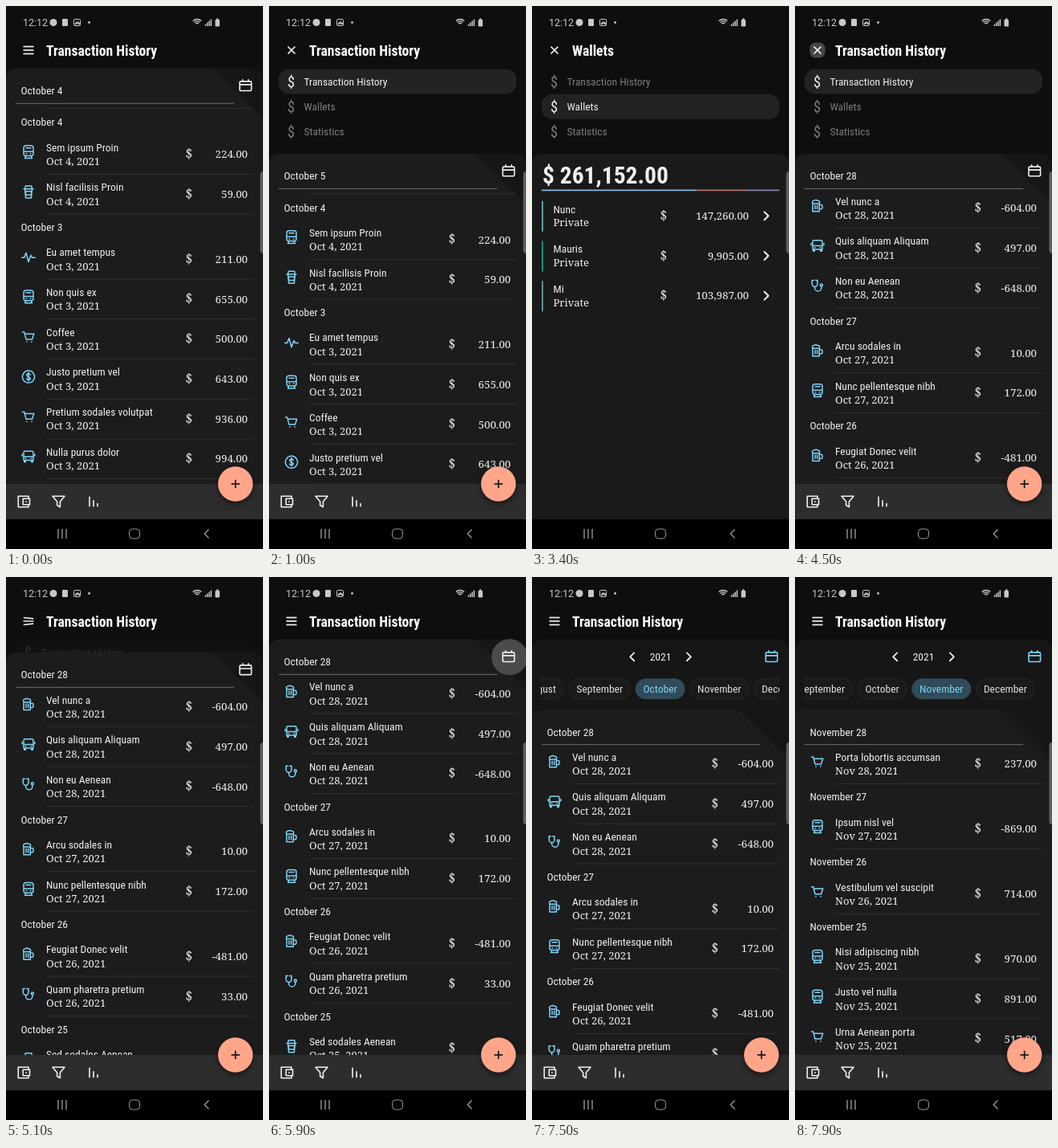
Write an HTML page with a canvas that moves like this. It is 320x676 px and loops after 8000 ms.

```html
<!DOCTYPE html>
<html lang="en">
<head>
<meta charset="utf-8">
<title>Transaction History</title>
<style>
html, body { margin: 0; height: 100%; overflow: hidden; background: #000; }
canvas { display: block; width: 100vw; height: 100vh; }
</style>
</head>
<body>
<canvas></canvas>
<script>
const canvas = document.querySelector('canvas');
const ctx = canvas.getContext('2d');
const LOOP = 8000, WHITE = '#f0f0f0', CYAN = '#7fd3f8', CORAL = '#ffa68a';
const BACK = '#0e0e0e', PANEL = '#1c1c1c', SHEET = '#161616', RULE = '#303030';

// Icons on a 24 unit grid
const icons = {
  train: 'M8 1h8q4 0 4 4v9q0 4-3 4H7q-3 0-3-4V5q0-4 4-4zM4 11h16M8 14.5h1M15 14.5h1M8 18l-2 4h12l-2-4M8 5h8',
  cup: 'M4 7h16M6 7l1-5h10l1 5M6 7l1.5 15h9L18 7M7 11h10l-.5 6h-9z',
  pulse: 'M1 13h4l3-8 4 15 4-11 2 4h5',
  cart: 'M2 4h3l3 12h10l3-9H6M9 20h.6M17 20h.6',
  coin: 'M12 2a10 10 0 1 0 .01 0zM15 9C15 6 9 6.5 9 9.5S15 12 15 14.7 9 17.5 9 15M12 5v14',
  car: 'M6 3h12q2 0 2 3v12H4V6q0-3 2-3zM4 12h16M7 15h1M16 15h1M5 18v3h2v-3M17 18v3h2v-3M1.5 8v3M22.5 8v3',
  beer: 'M4 8v13h11V8M4 8q-2-4 2-5 4-2 6 0 5 0 3 5zM15 10h3q2 0 2 2v3q0 2-2 2h-3M8 11v6M11.5 11v6',
  steth: 'M6 3H3v6a4.5 4.5 0 0 0 9 0V3h-3M7.5 13.5v2a5.5 5.5 0 0 0 11 0V13M18.5 9a2 2 0 1 0 .01 0z',
  calendar: 'M4 5h16q2 0 2 2v12q0 2-2 2H4q-2 0-2-2V7q0-2 2-2zM2 10.500h20M7 2v3M17 2v3',
  wallet: 'M20 7V3H3v18h17v-4M11 7h11v10H11zM15.5 12h1',
  funnel: 'M2 3h20l-7.5 9v9l-5-3v-6z',
  bars: 'M4 3v18M12 10v11M20 16v5',
  right: 'M9 5l7 7-7 7',
  left: 'M15 5l-7 7 7 7'
};
for (const name in icons) icons[name] = new Path2D(icons[name]);

// Each day: label, then "icon|title|amount" rows
const days = (month, text) => text.split('\n').map(line => {
  const [day, ...rows] = line.split('; ');
  return { label: `${month} ${day}`, date: `${month.slice(0, 3)} ${day}, 2021`, rows: rows.map(r => r.split('|')) };
});
const earlyOctober = days('October', `4; train|Sem ipsum Proin|224.00; cup|Nisl facilisis Proin|59.00
3; pulse|Eu amet tempus|211.00; train|Non quis ex|655.00; cart|Coffee|500.00; coin|Justo pretium vel|643.00; cart|Pretium sodales volutpat|936.00; car|Nulla purus dolor|994.00`);
const lateOctober = days('October', `28; beer|Vel nunc a|-604.00; car|Quis aliquam Aliquam|497.00; steth|Non eu Aenean|-648.00
27; beer|Arcu sodales in|10.00; train|Nunc pellentesque nibh|172.00
26; beer|Feugiat Donec velit|-481.00; steth|Quam pharetra pretium|33.00
25; cup|Sed sodales Aenean|45.00`);
const november = days('November', `28; cart|Porta lobortis accumsan|237.00
27; train|Ipsum nisl vel|-869.00
26; cart|Vestibulum vel suscipit|714.00
25; train|Nisi adipiscing nibh|970.00; train|Justo vel nulla|891.00; cart|Urna Aenean porta|517.00`);
const pages = ['Transaction History', 'Wallets', 'Statistics'];
const months = ['August', 'September', 'October', 'November', 'December'];

const ramp = (t, from, to) => Math.min(1, Math.max(0, (t - from) / (to - from)));
const ease = (t, from, to) => { const x = ramp(t, from, to); return x * x * (3 - 2 * x); };
const mix = (a, b, p) => a + (b - a) * p;
const pulse = (t, start) => t < start ? 0 : 1 - ramp(t, start, start + 300);

const sans = (size, weight = 400) => `${weight} ${size}px "Roboto Condensed", Roboto, sans-serif`;
const serif = size => `${size}px "Noto Serif", serif`;
let tracking = 0; // em, used when no condensed face is installed

function checkCondensed() {
  const width = font => (ctx.font = font, ctx.measureText('Transaction History').width);
  tracking = width(sans(100)) < width('100px Roboto, sans-serif') - 20 ? 0 : -0.05;
}
function setFont(font) {
  ctx.font = font;
  const size = parseFloat(font.match(/([\d.]+)px/)[1]);
  ctx.letterSpacing = (font.includes('Condensed') ? tracking * size : 0) + 'px';
  return size;
}
function text(str, x, y, font = sans(13.5), color = WHITE, align = 'left') {
  const size = setFont(font);
  ctx.fillStyle = color;
  ctx.textAlign = align;
  ctx.fillText(str, x, y + size * 0.355);
}
function money(amount, x, right, y) {
  text('$', x, y, serif(15.5));
  text(amount, right, y, serif(13.3), WHITE, 'right');
}
function box(x, y, w, h, r, fill, stroke) {
  ctx.beginPath();
  ctx.roundRect(x, y, w, h, r);
  if (fill) { ctx.fillStyle = fill; ctx.fill(); }
  if (stroke) { ctx.strokeStyle = stroke; ctx.lineWidth = 1; ctx.stroke(); }
}
const disc = (x, y, r, color) => box(x - r, y - r, 2 * r, 2 * r, r, color);
function line(x1, y1, x2, y2, color, width = 1) {
  ctx.strokeStyle = color;
  ctx.lineWidth = width;
  ctx.beginPath();
  ctx.moveTo(x1, y1);
  ctx.lineTo(x2, y2);
  ctx.stroke();
}
function icon(name, x, y, color = WHITE, size = 18, width = 1.5) {
  ctx.save();
  ctx.translate(x - size / 2, y - size / 2);
  ctx.scale(size / 24, size / 24);
  ctx.lineWidth = width * 24 / size;
  ctx.lineCap = ctx.lineJoin = 'round';
  ctx.strokeStyle = color;
  ctx.stroke(icons[name]);
  ctx.restore();
}
function layer(alpha, draw, clip) {
  if (alpha <= 0) return;
  ctx.save();
  ctx.globalAlpha *= alpha;
  if (clip) { ctx.beginPath(); ctx.rect(...clip); ctx.clip(); }
  draw();
  ctx.restore();
}

function statusBar() {
  const grey = '#c8c8c8';
  text('12:12', 21, 20.5, '12.5px Roboto, sans-serif', grey);
  disc(59, 20.5, 4.5, grey);
  box(70, 16, 7, 9, 1, grey);
  box(84.5, 16.5, 8, 8, 1, null, grey);
  line(86, 23, 89, 20, grey, 2);
  line(89, 20, 92, 23, grey, 2);
  disc(103.5, 20.5, 1.4, grey);
  for (const r of [2.5, 5, 7.5]) {
    ctx.beginPath();
    ctx.arc(238, 24, r, -2.35, -0.8);
    ctx.strokeStyle = grey;
    ctx.lineWidth = 1.4;
    ctx.stroke();
  }
  for (let i = 0; i < 4; i++) line(248.5 + i * 2.3, 25, 248.5 + i * 2.3, 22.5 - i * 2, grey, 1.5);
  box(260.5, 17, 5.5, 8.5, 1, grey);
  box(262, 15.5, 2.5, 2, 0, grey);
}

function menuButton(open, ripple) {
  layer(ripple, () => box(18.5, 45.5, 19, 19, 7, '#464646'));
  const x = mix(6.5, 4.5, open), y = 4.5, turn = y * (1 - 2 * open);
  line(28 - x, 55 - y, 28 + x, 55 - turn, WHITE, 1.7);
  line(28 - x, 55 + y, 28 + x, 55 + turn, WHITE, 1.7);
  layer(1 - open, () => line(21.5, 55, 34.5, 55, WHITE, 1.7));
}

function menu(selected) {
  pages.forEach((name, i) => {
    const y = 94 + i * 31.2, on = i === selected, color = on ? WHITE : '#7d7d7d';
    if (on) box(12, y - 15.5, 296, 31, 13, '#232323');
    text('$', 27.5, y, sans(18.5), color, 'center');
    text(name, 43.5, y, sans(13.5), color);
  });
}

function list(data, y) {
  for (const day of data) {
    text(day.label, 18.5, y);
    y += 31.2;
    for (const [name, title, amount] of day.rows) {
      icon(name, 28, y + 6, CYAN);
      text(title, 50, y);
      text(day.date, 50, y + 17.5, serif(13));
      money(amount, 223.5, 301, y + 8.7);
      line(50, y + 33.5, 308, y + 33.5, RULE);
      y += 49.7;
    }
  }
}

function filter(top, shift) {
  icon('left', 125, top + 21.5, WHITE, 17, 1.8);
  text('2021', 160, top + 21.5, sans(13.5), WHITE, 'center');
  icon('right', 195, top + 21.5, WHITE, 17, 1.8);
  layer(1, () => {
    setFont(sans(13.5));
    const widths = months.map(m => ctx.measureText(m).width + 19);
    let x = mix(129, 78, shift) - widths[0] - widths[1] - 13;
    months.forEach((name, i) => {
      const on = i === (shift > 0.4 ? 3 : 2);
      box(x, top + 49, widths[i], 25, 12.5, on ? '#304b59' : '#1a1a1a', on ? '#304b59' : '#282828');
      text(name, x + widths[i] / 2, top + 61.5, sans(13.5), on ? CYAN : '#dedede', 'center');
      x += widths[i] + 6.5;
    });
  }, [11, top + 40, 297, 45]);
}

function frontPanel(y) {
  const cut = 63;
  ctx.fillStyle = PANEL;
  ctx.beginPath();
  ctx.moveTo(0, 640);
  ctx.lineTo(0, y + 14);
  ctx.quadraticCurveTo(0, y, 14, y);
  ctx.lineTo(320 - cut, y);
  ctx.lineTo(320, y + cut);
  ctx.lineTo(320, 640);
  ctx.fill();
}

function bottomBar() {
  box(0, 595, 320, 44, 0, '#2d2d2d');
  icon('wallet', 22, 617, WHITE, 18, 1.6);
  icon('funnel', 65.5, 617, WHITE, 18, 1.6);
  icon('bars', 109, 617, WHITE, 15, 1.6);
  ctx.save();
  ctx.shadowColor = 'rgba(0,0,0,.5)';
  ctx.shadowBlur = 7;
  ctx.shadowOffsetY = 3;
  disc(285.7, 595, 21.7, CORAL);
  ctx.restore();
  line(280.5, 595, 291, 595, '#161616', 1.7);
  line(285.7, 589.8, 285.7, 600.2, '#161616', 1.7);
}

function transactions(t, top) {
  const expanded = ease(t, 5900, 6300), shift = ease(t, 7500, 7850), swap = ramp(t, 7550, 7850);
  const front = top + 87.3 * expanded, label = front + 27.7;
  const late = t >= 3700;
  box(0, top, 320, 640 - top, [14, 14, 0, 0], SHEET);
  layer(expanded, () => filter(top, shift));
  frontPanel(front);
  layer(pulse(t, 5900), () => disc(299.5, top + 22, 22.5, '#4c4c4c'));
  icon('calendar', 298.3, top + 21.2, t > 6000 ? CYAN : WHITE, 17.5, 1.6);

  const body = [0, label + 16, 320, 595 - label - 16];
  if (late) {
    layer(1 - swap, () => list(lateOctober, label), body);
    layer(swap, () => list(november, label), body);
  } else {
    layer(1, () => {
      list(earlyOctober, label + 39.2);
      line(50, label + 22, 308, label + 22, RULE);
    }, body);
  }
  const sticky = late ? (swap > 0.5 ? 'November 28' : 'October 28') : t < 500 ? 'October 4' : 'October 5';
  text(sticky, 18.5, label);
  line(12, label + 15.8, 284, label + 15.8, '#6c6c6c');
  bottomBar();
}

function wallets(top) {
  box(0, top, 320, 639 - top, [14, 14, 0, 0], '#1a1a1a');
  text('$ 261,152.00', 13, 210.5, sans(29.5, 700));
  line(12, 229.3, 204, 229.3, '#82b9e4', 1.8);
  line(204, 229.3, 268, 229.3, '#b97471', 1.8);
  line(268, 229.3, 308, 229.3, '#8c80b0', 1.8);
  const rows = [['Nunc', '147,260.00', '#6fb5bd'], ['Mauris', '9,905.00', '#209f91'], ['Mi', '103,987.00', '#6ba5ab']];
  rows.forEach(([name, amount, color], i) => {
    const y = 252.8 + i * 49.7;
    line(13, y - 10, 13, y + 28, color, 1.7);
    text(name, 26.5, y);
    text('Private', 26.5, y + 17, serif(13));
    money(amount, 159.5, 270, y + 8.5);
    icon('right', 291.5, y + 8.5, WHITE, 17, 2);
  });
}

function systemBar() {
  const grey = '#969696';
  box(0, 639, 320, 37, 0, '#000');
  for (const x of [65, 70, 75]) line(x, 651, x, 663, grey, 1.4);
  box(153.5, 651, 13, 12, 4, null, grey);
  icon('left', 250, 657, grey, 17, 1.4);
}

function draw(t) {
  const open = ease(t, 430, 980) - ease(t, 4550, 5280);
  const page = ramp(t, 2000, 2200) - ramp(t, 3400, 3600);
  const walletView = ramp(t, 2150, 2400) - ramp(t, 3700, 4000);
  const top = mix(77.8, 184, open);

  box(0, 0, 320, 676, 0, BACK);
  statusBar();
  menuButton(open, Math.max(pulse(t, 400), pulse(t, 4500)));
  [1 - page, page].forEach((alpha, i) => layer(alpha, () => {
    text(pages[i], 50, 55.5, sans(17.6, 700), '#fff');
    layer(open, () => menu(i));
  }));
  transactions(t, top);
  layer(walletView, () => wallets(top));
  systemBar();
  box(316.5, 206, 8, 102, 4, '#606060');
}

function frame(now) {
  const ratio = window.devicePixelRatio || 1;
  const w = Math.round(innerWidth * ratio), h = Math.round(innerHeight * ratio);
  if (canvas.width !== w || canvas.height !== h) { canvas.width = w; canvas.height = h; }
  ctx.setTransform(w / 320, 0, 0, h / 676, 0, 0);
  draw(now % LOOP);
  requestAnimationFrame(frame);
}
checkCondensed();
requestAnimationFrame(frame);
</script>
</body>
</html>
```
